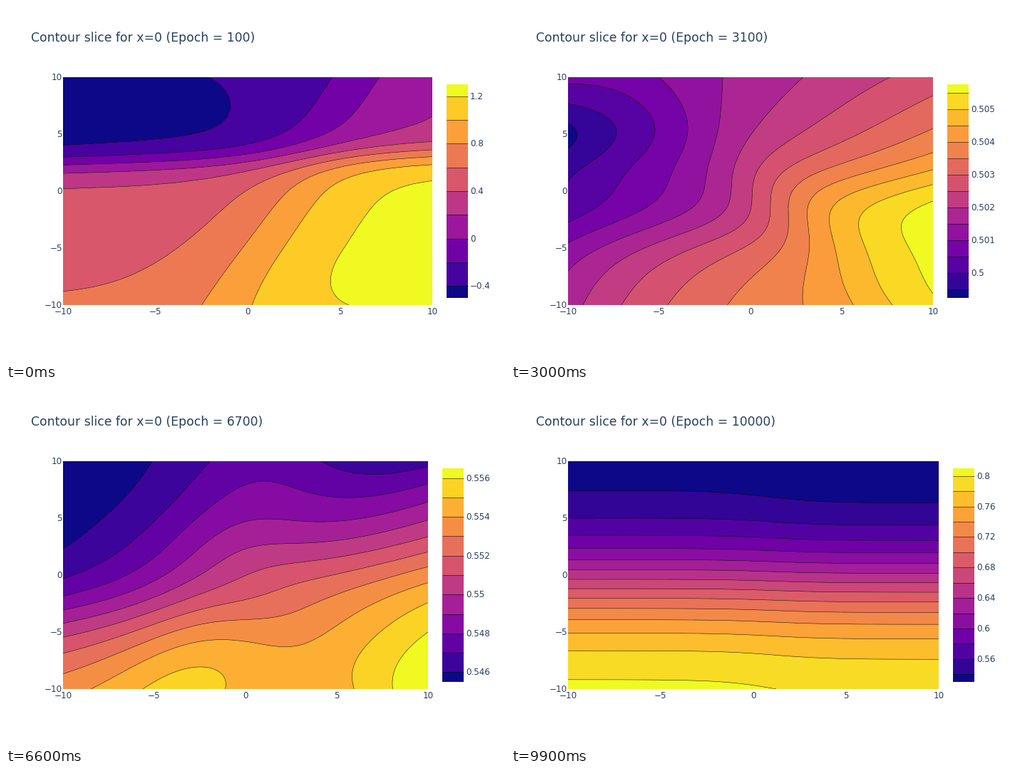
Recreate the animation shown at these times as a matplotlib script. Size 700 by 500 pixels, loop 10 s.

```python
import numpy as np
import matplotlib.pyplot as plt
from matplotlib.animation import FuncAnimation
from matplotlib.colors import LinearSegmentedColormap
from matplotlib.patches import Rectangle

W, H, DPI = 700, 500, 100
LEFT, TOP, HEIGHT = 80, 100, 320
INK = "#2a3f5f"
PLASMA = LinearSegmentedColormap.from_list("plasma10", [
    "#0d0887", "#46039f", "#7201a8", "#9c179e", "#bd3786",
    "#d8576b", "#ed7953", "#fb9f3a", "#fdca26", "#f0f921"], N=2048)
plt.rcParams["font.family"] = "DejaVu Sans"

X, Y = np.meshgrid(np.linspace(-10, 10, 97), np.linspace(10, -10, 65))
tanh = np.tanh


def gauss(a, center, width):
    return np.exp(-((a - center) / width) ** 2)


def fit(z, lo, hi):
    """Rescale a surface to a known range."""
    return lo + (z - z.min()) / np.ptp(z) * (hi - lo)


def cliff():
    """Two plateaus, each stepping up in x, joined by a steep drop in y."""
    t = tanh((X - .9 - .35 * (Y + 5)) / 4)
    low = (.9 + .36 * t - .015 * (Y + 5) * (1 - t) / 2
           - .0025 * np.minimum(Y + 5.5, 0) ** 2 * (1 + t) / 2)
    rise = tanh((X - 3.5 - .6 * (Y - 5.3)) / 4)
    high = -.43 + .004 * X + .012 * (Y - 5) + .3 * (1 + rise)
    s = (1 + tanh((Y - 2.9 - .042 * X) / 1.6)) / 2
    return low * (1 - s) + high * s


def stream(drop, reach, slope, ridge, bend):
    """Tilted sheet with a slanting step along x = bend."""
    return slope * X - drop * tanh(Y / reach) + ridge * tanh((X - bend) / 3)


def swell(base, slope, bump):
    """Falling profile in y with a hump and a valley to its right."""
    hump = bump * gauss(X, -1.5 + .2 * Y, 4)
    valley = (.6 + .024 * Y ** 2 - .04 * Y) * gauss(X, 6 + .27 * Y, 5)
    fall = base - 5.3 * tanh((Y + 4) / 6.5)
    return fall + (slope - .001 * Y ** 2) * (X + 10) + hump - valley


def layers():
    return -.15 * tanh((Y + .75) / 6.1) - .00375 * (1 + tanh((X - 1) / 3))


dent = (.16 * Y - 1.7 * gauss(Y, 5, 3)) * (np.minimum(X, 0) / 10) ** 2
flat = fit(stream(2.8, 6.5, .31 - .0011 * Y ** 2,
                  .8 + 1.3 * gauss(Y, -1.5, 3.5), .7 - .6 * Y) + dent, -1.4, 11.1)
tilted = fit(flat + .013 * X - .033 * Y, -1.1, 12.05)
rising = fit(stream(4.8, 7.5, .35 - .0013 * Y ** 2 - .004 * Y,
                    1.6 * gauss(Y, -1, 4), .5 - .5 * Y), -2.5, 11.1)

# time in ms, surface
KEYS = [
    (0, fit(cliff(), -.48, 1.27)),
    (1900, .5 + .0005 * flat),
    (4000, .5 + .0005 * tilted),
    (5500, .5 + .001 * rising),
    (7700, .6 + .001 * fit(swell(-2.45, .2, 2), -8.1, 3.3)),
    (8600, .6 + .001 * fit(swell(-.6, .11, 1.8), -7.6, 4.2)),
    (9900, fit(layers(), .522, .804)),
]


def split(z):
    lo, hi = z.min(), z.max()
    mid, span = (lo + hi) / 2, hi - lo
    return mid, span, (z - mid) / span


PARTS = [split(z) for _, z in KEYS]


def surface(t):
    """Blend shape and centre linearly, the value range geometrically."""
    i = max(j for j in range(len(KEYS) - 1) if KEYS[j][0] <= t)
    t0, t1 = KEYS[i][0], KEYS[i + 1][0]
    w = (t - t0) / (t1 - t0)
    if i == 0:
        w = 1 - (1 - w) ** 2
    (m0, s0, n0), (m1, s1, n1) = PARTS[i], PARTS[i + 1]
    span = s0 ** (1 - w) * s1 ** w
    return (1 - w) * m0 + w * m1 + span * ((1 - w) * n0 + w * n1)


def nice_step(span):
    rough = span / 15
    base = 10 ** np.floor(np.log10(rough))
    return next(base * f for f in (2, 5, 10) if base * f >= rough)


def label(v):
    s = f"{v:.5f}".rstrip("0").rstrip(".")
    return s.replace("-", "\u2212")


def label_width(s):
    return sum({".": 4.36, "\u2212": 9.8}.get(ch, 7.63) for ch in s)


fig = plt.figure(figsize=(W / DPI, H / DPI), dpi=DPI, facecolor="white")
ax = fig.add_axes([0, 0, 1, 1])


def px(n):
    return n * 72 / DPI


def text(x, y, s, size=12, ha="left"):
    ax.text(x, y, s, fontsize=px(size), ha=ha, va="baseline", color=INK)


def draw(i):
    ax.clear()
    ax.set(xlim=(0, W), ylim=(H, 0))
    ax.axis("off")

    z = surface(i * 100)
    step = nice_step(np.ptp(z))
    ks = np.arange(np.ceil(z.min() / step), np.floor(z.max() / step) + 1).astype(int)
    levels = ks * step
    n = len(ks)
    colors = PLASMA(np.linspace(0, 1, n + 1))
    ticks = {j: label(k * step) for j, k in enumerate(ks) if k % 2 == 0}
    width = round(547 - max(map(label_width, ticks.values())))

    x = LEFT + (X + 10) / 20 * width
    y = TOP + (10 - Y) / 20 * HEIGHT
    bounds = np.r_[levels[0] - 2 * step, levels, levels[-1] + 2 * step]
    ax.contourf(x, y, z, levels=bounds, colors=colors)
    ax.contour(x, y, z, levels=levels, colors="black", linewidths=px(.5),
               linestyles="solid")

    text(35, 50, f"Contour slice for x=0 (Epoch = {100 * (i + 1)})", 17.2)
    for v in range(-10, 11, 5):
        f = (v + 10) / 20
        text(LEFT + f * width, 433, label(v), ha="center")
        text(79, TOP + (1 - f) * HEIGHT + 4, label(v), ha="right")

    bar = LEFT + width + 20
    marks = 410 - (np.arange(n) + .5) * 300 / n
    edges = np.r_[410, marks, 110]
    for a, b, c in zip(edges, edges[1:], colors):
        ax.add_patch(Rectangle((bar, b), 30, a - b, fc=c, lw=0, antialiased=False))
    ax.hlines(marks, bar, bar + 30, color="black", lw=px(.5))
    for j, s in ticks.items():
        text(bar + 33, marks[j] + 4, s)
    return []


anim = FuncAnimation(fig, draw, frames=100, interval=100, init_func=lambda: [],
                     repeat=True, repeat_delay=0)
plt.show()
```
